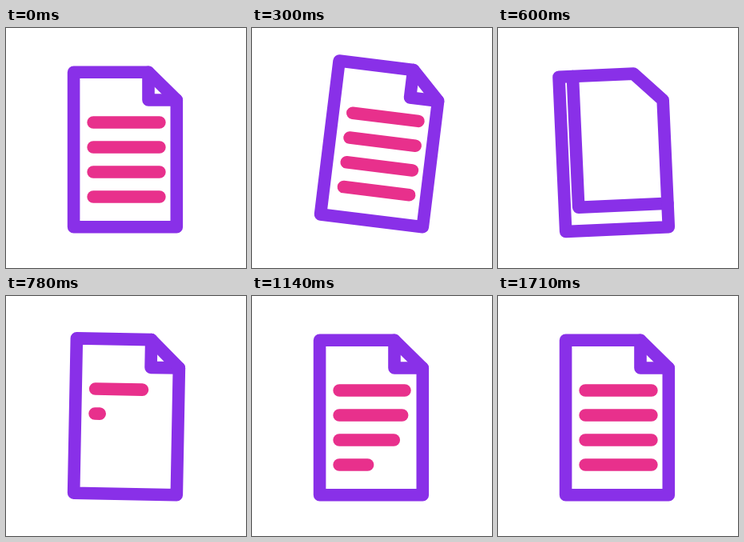
These frames come from a looping animation (300 px wide and 300 px high, 2400 ms). An HTML page with a canvas:

```html
<!DOCTYPE html>
<html lang="en">
<head>
<meta charset="utf-8">
<title>Document</title>
<style>
  html, body { margin: 0; width: 100%; height: 100%; overflow: hidden; background: #fff; }
  canvas { display: block; width: 300px; height: 300px; }
</style>
</head>
<body>
<canvas id="stage"></canvas>
<script>
const LOOP = 2400;
const PURPLE = '#8930e8', PINK = '#e8308c';
const page = { l: 84.6, t: 55.3, r: 213.3, b: 248.7 };
const notch = { x: 178, y: 90 };
const rows = [118, 149, 180, 211];
const rowStart = 109.1, rowEnd = 191.9;

// [time, value] keys
const tilt = [[0, 0], [285, 7.1], [520, -3.2], [885, 2.1], [1120, 0]];
const fold = [[300, 0], [536, 1], [765, 0]];
const ERASE = 536, WRITE = 622, STAGGER = 149;

const canvas = document.getElementById('stage');
const ctx = canvas.getContext('2d');
const ratio = window.devicePixelRatio || 1;
canvas.width = canvas.height = 300 * ratio;

const mix = (a, b, u) => a + (b - a) * u;
const ease = u => (1 - Math.cos(Math.PI * u)) / 2;

function valueAt(keys, t) {
  if (t <= keys[0][0]) return keys[0][1];
  for (let i = 1; i < keys.length; i++) {
    const [t0, a] = keys[i - 1], [t1, b] = keys[i];
    if (t < t1) return mix(a, b, ease((t - t0) / (t1 - t0)));
  }
  return keys[keys.length - 1][1];
}

function rowLength(i, t) {
  if (t < ERASE) return 1;
  const dt = t - WRITE - i * STAGGER;
  return dt <= 0 ? 0 : Math.min(1, 1.007 * (1 - Math.exp(-0.0077 * dt)));
}

function trace(points, closed) {
  ctx.beginPath();
  points.forEach(([x, y]) => ctx.lineTo(x, y));
  if (closed) ctx.closePath();
}

function draw(t) {
  ctx.setTransform(ratio, 0, 0, ratio, 0, 0);
  ctx.fillStyle = '#fff';
  ctx.fillRect(0, 0, 300, 300);

  ctx.translate(page.r, page.b);
  ctx.rotate(valueAt(tilt, t) * Math.PI / 180);
  ctx.translate(-page.r, -page.b);
  ctx.lineWidth = 15.6;
  ctx.lineCap = ctx.lineJoin = 'round';

  ctx.strokeStyle = PINK;
  rows.forEach((y, i) => {
    const k = rowLength(i, t);
    if (!k) return;
    trace([[rowStart, y], [mix(rowStart, rowEnd, k), y]]);
    ctx.stroke();
  });

  // The folded corner travels towards the opposite corner of the page
  const k = valueAt(fold, t);
  const x = mix(notch.x, page.l, k), y = mix(notch.y, page.b, k);
  const top = [notch.x, page.t], side = [page.r, notch.y];
  const flap = [[x, page.t], [x, y], [page.r, y]];
  trace([top, ...flap, side], true);
  ctx.fill();

  ctx.strokeStyle = PURPLE;
  trace(flap);
  ctx.stroke();
  trace([top, [page.l, page.t], [page.l, page.b], [page.r, page.b], side], true);
  ctx.stroke();
}

const start = performance.now();
function tick() {
  draw((performance.now() - start) % LOOP);
  requestAnimationFrame(tick);
}
tick();
</script>
</body>
</html>
```
